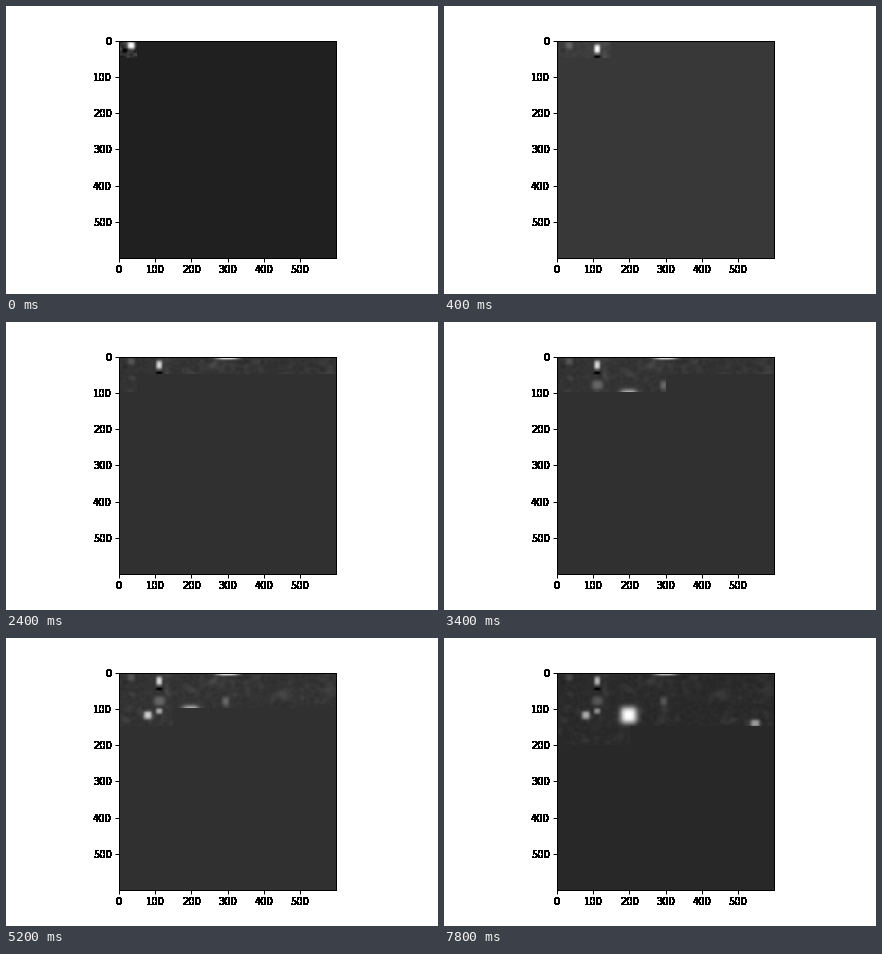
Animation of 432 by 288 pixels, one loop 8000 ms. Source, as a matplotlib script:

```python
import numpy as np
import matplotlib.pyplot as plt
from matplotlib.animation import FuncAnimation

SIZE, TILE, FRAMES = 600, 50, 40

# x, y, half width, half height, value at the centre
SPOTS = [
    (33, 14, 10, 10, 30.5), (16, 28, 8, 6, -4.5),
    (110, 24, 8, 12, 139), (110, 46, 9, 4, -40),
    (298, 1, 30, 8, 172.5), (111, 79, 16, 13, 45), (293, 80, 10, 12, 45),
    (79, 118, 11, 11, 130), (110, 107, 9, 8, 100),
    (197, 118, 23, 23, 215), (545, 141, 13, 11, 115),
]


def smooth_noise(rng, spacing):
    grid = np.arange(0, SIZE + spacing, spacing)
    kernel = np.exp(-((np.arange(SIZE)[:, None] - grid) / (0.85 * spacing)) ** 2)
    noise = kernel @ rng.normal(size=(grid.size, grid.size)) @ kernel.T
    return noise / noise.std()


def make_field(x, y):
    """Faint patches with a few boxy spots blended in."""
    rng = np.random.default_rng(4)
    field = 2 + 5 * np.maximum(smooth_noise(rng, 12), 0) + 1.5 * smooth_noise(rng, 5)
    field = field.clip(-4, 25)
    for cx, cy, rx, ry, value in SPOTS:
        weight = np.exp(-abs((x - cx) / rx) ** 3 - abs((y - cy) / ry) ** 3)
        field += weight * (value - field)
    return field


def harden(img, dpi):
    """Turn soft glyph edges solid."""
    img = img.copy()
    img[..., 3] = img[..., 3] > 0
    return img, 0, 0


y, x = np.mgrid[:SIZE, :SIZE]
field = make_field(x, y)
order = y // TILE * (SIZE // TILE) + x // TILE

plt.rcParams.update({"font.family": "DejaVu Sans", "font.size": 10})
fig, ax = plt.subplots(figsize=(6, 4), dpi=72, facecolor="white")
fig.subplots_adjust(left=0.125, right=0.9, bottom=0.125, top=0.88)
image = ax.imshow(np.zeros((SIZE, SIZE)), cmap="gray", interpolation="nearest")
ax.set_xticks(range(0, SIZE, 100))
ax.set_yticks(range(0, SIZE, 100))
ax.tick_params(width=1, length=4, pad=3)
ax.spines[:].set_linewidth(1)
for label in ax.get_xticklabels() + ax.get_yticklabels():
    label.set_agg_filter(harden)


def update(step):
    shown = np.where(order <= step, field, 0)
    image.set_data(shown)
    image.set_clim(shown.min(), shown.max())
    return [image]


anim = FuncAnimation(fig, update, frames=FRAMES, init_func=lambda: update(0),
                     interval=200, repeat=True, repeat_delay=0)
plt.show()
```
